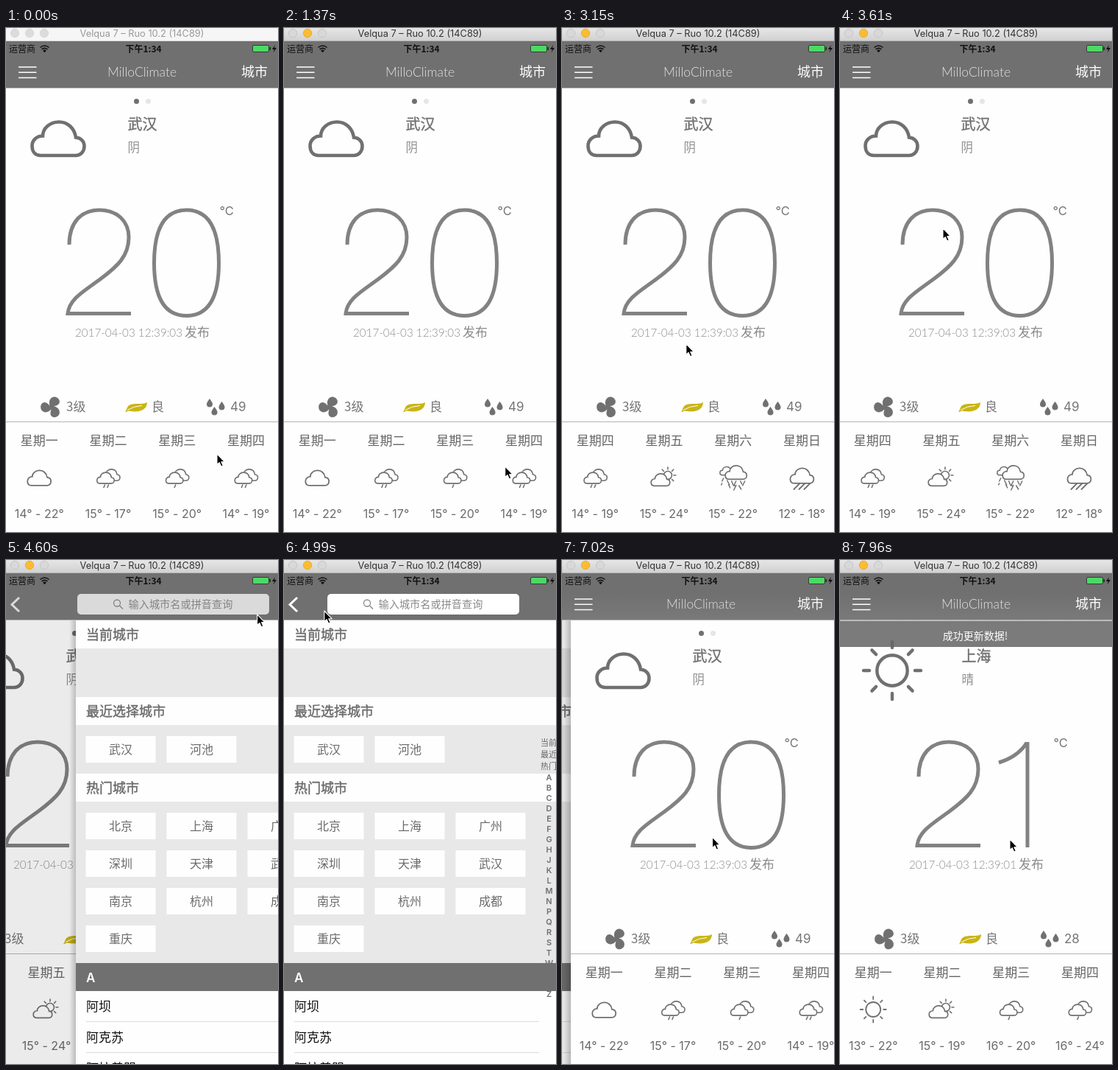
Animation, 370 px wide and 684 px high, one loop 8 s. Source, as an HTML page:

```html
<!DOCTYPE html>
<html lang="zh-CN">
<head>
<meta charset="utf-8">
<title>Weather</title>
<style>
  html, body { margin: 0; width: 100%; height: 100%; overflow: hidden; background: #fefefe; }
  svg { display: block; width: 370px; height: 684px; }
  text { font-family: "Noto Sans CJK SC", "Noto Sans CJK", sans-serif; }
  .num { font-family: Inter, Roboto, sans-serif; }
  .thin { font-family: Lato, "Open Sans", sans-serif; }
</style>
</head>
<body>
<svg id="stage" viewBox="0 0 370 684"></svg>
<script>
const LOOP = 8000, W = 375, CELL = 93.75;
const GREY = '#707070', PAPER = '#fefefe';

// Markup helpers
const text = (s, x, y, size, fill = GREY, weight = 400, extra = '') =>
  `<text x="${x}" y="${y}" font-size="${size}" fill="${fill}" font-weight="${weight}" ${extra}>${s}</text>`;
const MID = 'text-anchor="middle"', NUM = 'class="num"', THIN = 'class="thin"';
const medium = (s, x, y, size, fill) =>
  text(s, x, y, size, fill, 400, `stroke="${fill}" stroke-width=".4"`);
const rect = (x, y, w, h, fill, extra = '') =>
  `<rect x="${x}" y="${y}" width="${w}" height="${h}" fill="${fill}" ${extra}/>`;
const line = (d, w, stroke = GREY, extra = '') =>
  `<path d="${d}" fill="none" stroke="${stroke}" stroke-width="${w}" ${extra}/>`;
const at = (x, y, s) => `<g transform="translate(${x} ${y})">${s}</g>`;
const group = (id, s) => `<g id="${id}">${s}</g>`;
const ROUND = 'stroke-linecap="round"';

// Weather icons, centred on the origin
const CLOUD = 'M-24 23C-32 23-35.5 17-35.5 10C-35.5 2-29-3.5-21-3.5C-21-14-11-22.5 1-22.5' +
  'C13-22.5 22-14 24-1.5C31-1 35.5 4 35.5 10.5C35.5 18 30 23 24 23Z';
const cloud = (x, y, s, w) =>
  `<path d="${CLOUD}" transform="translate(${x} ${y}) scale(${s})" fill="${PAPER}" stroke="${GREY}" stroke-width="${w / s}"/>`;

function sun(r, near, far, w) {
  let rays = '';
  for (let i = 0; i < 8; i++) {
    const c = Math.cos(i * Math.PI / 4), s = Math.sin(i * Math.PI / 4);
    rays += `M${c * near} ${s * near}L${c * far} ${s * far}`;
  }
  return `<circle r="${r}" fill="none" stroke="${GREY}" stroke-width="${w}"/>` + line(rays, w, GREY, ROUND);
}

const twoClouds = cloud(4, -3.5, .34, 1.6) + cloud(-3.5, .5, .33, 1.6);
const icons = {
  cloud: cloud(0, .5, .45, 1.8),
  rain: twoClouds + line('M-2 10l-1.500 3.500', 1.6, GREY, ROUND),
  showers: twoClouds + line('M-4.500 10l-1.500 3.500M.5 10l-1.500 3.500', 1.6, GREY, ROUND),
  bright: at(5, -3, sun(5.5, 8, 11, 1.6)) + cloud(-5, 3, .36, 1.7),
  storm: cloud(-9, -9, .25, 1.5) + cloud(4, -7, .41, 1.7) +
    line('M-13 1l-2 4M-8 4l3 6M-2 5l2 5M4 5l-3 6h3l-3 6M10 5l2 4M16 5l-3 6M-6 10l2 4M8 11l3 5M-15 8l-1 2', 1.5, GREY, ROUND),
  pour: cloud(0, -2.5, .45, 1.8) + line('M-3 8l-8 8M4 8l-8 8M11 8l-8 8', 1.8, GREY, ROUND),
  sun: sun(10, 14, 17.5, 1.8)
};

const DIGITS = {
  2: 'M86 294C86 264 102 247 127 247C151 247 167 262 167 284C167 310 151 324 128 341C105 358 86 368 84 387.5H170',
  0: 'M245.500 247C275 247 289.500 272 289.500 319C289.500 366 275 390.500 245.500 390.500C216 390.500 201.500 366 201.500 319C201.500 272 216 247 245.500 247Z',
  1: 'M216 275C232 270 246 261 254 248M255 247V390'
};
const digit = (n, dx = 0) => line(DIGITS[n], 5, '#828282', `transform="translate(${dx})"`);

function drop(x, y) {
  return `<path transform="translate(${x} ${y})" fill="${GREY}" d="M0-6C3-2 4 0 4 1.5A4 4 0 0 1-4 1.5C-4 0-3-2 0-6Z"/>`;
}

const fan = at(62, 514.5, [20, 140, 260].map(a =>
  `<path transform="rotate(${a})" fill="${GREY}" d="M-1 1C-7-4-7-12-1-14.5C6-16 10-10 7-6C5-3 2-3 1 1Z"/>`).join(''));
const leaf = '<path fill="#c9b514" d="M162 521.500C164 518 164 517 165 515C168 509 177 510 183 510C187 510 190 509 192 508C192 517 183 523 167 519.500Z"/>' +
  line('M165 518.500Q174 513 185 512.500', 1, PAPER);

const forecast = days => days.map(([day, icon, low, high], i) => at(45.2 + CELL * i, 0,
  text('星期' + day, 0, 566, 17, '#666', 400, MID) + at(0, 610, icons[icon]) +
  text(`${low}° - ${high}°`, 0, 665, 16, '#6a6a6a', 400, `${MID} ${NUM}`))).join('');

function home(d, stripId) {
  return rect(0, 81, W, 603, PAPER) +
    `<circle cx="177.500" cy="99.500" r="3.500" fill="${GREY}"/><circle cx="193.500" cy="99.500" r="3.500" fill="#e6e6e6"/>` +
    rect(0, 534, W, 1, '#b4b4b4') +
    `<g class="body">` +
    at(71, 150, d.icon) +
    medium(d.city, 165.5, 138, 20, GREY) + text(d.sky, 165.5, 168, 16.5, '#8f8f8f') +
    d.digits + text('°C', 290.500, 254, 16.5, '#757575', 400, NUM) +
    text(`2017-04-03 12:39:${d.sec}`, 94, 419, 15.2, '#8c8c8c', 300, THIN) +
    text('发布', 243, 419, 17, '#8a8a8a') +
    fan + text('3级', 82, 520, 17, '#757575') +
    leaf + text('良', 198, 520, 17, '#757575') +
    drop(277, 509) + drop(293.5, 513) + drop(283.5, 520) +
    text(d.wet, 305, 520, 17, '#757575', 400, NUM) +
    group(stripId, forecast(d.days)) + '</g>';
}

const wuhan = {
  city: '武汉', sky: '阴', sec: '03', wet: 49,
  icon: cloud(0, 0, 1, 4.6), digits: digit(2) + digit(0),
  days: [['一', 'cloud', 14, 22], ['二', 'showers', 15, 17], ['三', 'rain', 15, 20], ['四', 'showers', 14, 19],
    ['五', 'bright', 15, 24], ['六', 'storm', 15, 22], ['日', 'pour', 12, 18]]
};
const shanghai = {
  city: '上海', sky: '晴', sec: '01', wet: 28,
  icon: sun(20.7, 31, 39, 4.4), digits: digit(2, 21) + digit(1),
  days: [['一', 'sun', 13, 22], ['二', 'bright', 15, 19], ['三', 'rain', 16, 20], ['四', 'rain', 16, 24]]
};

function cityPage() {
  const head = (s, y) => rect(0, y, W, 38, PAPER) + medium(s, 14, y + 25.5, 18, '#6a6a6a');
  const tiles = (names, y) => names.map((n, i) => {
    const x = 13.5 + 110 * (i % 3), top = y + 51 * Math.floor(i / 3);
    return rect(x, top, 95, 36, PAPER) + text(n, x + 47.5, top + 23.5, 16, '#6a6a6a', 400, MID);
  }).join('');
  const rows = ['阿坝', '阿克苏', '阿拉善盟'].map((n, i) =>
    text(n, 14, 612 + 42 * i, 17, '#111') + rect(14, 626 + 42 * i, 333, 1, '#dcdcdc')).join('');
  const index = ['当前', '最近', '热门'].map((s, i) => text(s, 360, 252 + 16 * i, 11, '#666', 400, MID)).join('') +
    [...'ABCDEFGHJKLMNPQRSTWXYZ'].map((s, i) =>
      text(s, 360.5, 299 + 14 * i, 11, GREY, 600, `${MID} ${NUM}`)).join('');
  return rect(0, 81, W, 603, '#e8e8e8') + rect(0, 81, W, 2, PAPER) +
    head('当前城市', 82) + head('最近选择城市', 186) + tiles(['武汉', '河池'], 239) +
    head('热门城市', 290) +
    tiles(['北京', '上海', '广州', '深圳', '天津', '武汉', '南京', '杭州', '成都', '重庆'], 343) +
    rect(0, 585, W, 99, PAPER) + rect(0, 547, W, 38, GREY) +
    text('A', 14, 572.5, 17, '#fff', 600, NUM) + rows + index;
}

const status = text('运营商', 4, 33, 12, '#111') +
  line('M46.500 26.500Q52.500 21.500 58.500 26.500M48.500 29Q52.500 25.700 56.500 29', 1.6, '#111') +
  '<path d="M50 30.500Q52.500 28.500 55 30.500L52.500 33.200Z" fill="#111"/>' +
  text('下午1:34', 187, 32.500, 12, '#111', 700, MID) +
  rect(335.5, 23.5, 22, 9, '#4cd964', 'rx="1.5" stroke="#222" stroke-width=".8"') +
  rect(358.5, 26, 1.5, 4, '#222') +
  '<path d="M366 23L362 29H365L363.500 33.500L368 27H365Z" fill="#111"/>';

const homeNav = line('M17 53H41.500M17 60.300H41.500M17 67.500H41.500', 1.5, '#fff') +
  group('title', text('MilloClimate', 185, 66, 17.5, '#e2e2e2', 300, `${MID} ${THIN}`)) +
  text('城市', 320, 66, 18, '#fff');
const cityNav = line('M18 51L8 60.500L18 70', 3, '#fff') +
  group('search', rect(59, 46, 261, 28, '#fff', 'rx="5"') +
    `<circle cx="113" cy="58.500" r="4.500" fill="none" stroke="#8a8a8a" stroke-width="1.300"/>` +
    line('M116.500 62L121 66.500', 1.4, '#8a8a8a') +
    text('输入城市名或拼音查询', 128.500, 65, 14.2, '#8a8a8a'));

const windowBar = rect(0, 0, 370, 18, '#f6f6f6', 'id="bar"') + rect(0, 17, 370, 1, '#b8b8b8', 'id="rim"') +
  [12, 32, 52].map((x, i) => `<circle id="dot${i}" cx="${x}" cy="7" r="5.700" stroke-width=".700"/>`).join('') +
  text('Velqua 7 – Ruo 10.2 (14C89)', 185, 11.500, 12.8, '#999', 400, `id="caption" ${MID} ${NUM}`);

const stage = document.getElementById('stage');
stage.innerHTML =
  `<defs>
    <linearGradient id="chrome" x2="0" y2="1"><stop stop-color="#e6e6e6"/><stop offset="1" stop-color="#d0d0d0"/></linearGradient>
    <linearGradient id="edge"><stop stop-color="#000" stop-opacity="0"/><stop offset="1" stop-color="#000" stop-opacity=".2"/></linearGradient>
    <linearGradient id="haze" x2="0" y2="1"><stop stop-color="#fff" stop-opacity="0"/><stop offset="1" stop-color="#fff" stop-opacity=".07"/></linearGradient>
  </defs>` +
  group('first', home(wuhan, 'strip')) +
  rect(0, 82, 370, 602, '#000', 'id="shade1"') +
  group('city', rect(-9, 82, 9, 602, 'url(#edge)') + cityPage()) +
  rect(0, 82, 370, 602, '#000', 'id="shade2"') +
  group('second', rect(-9, 82, 9, 602, 'url(#edge)') +
    group('stale', home(wuhan, 'stripStale')) + group('fresh', home(shanghai, 'stripFresh'))) +
  group('banner', rect(0, 82.5, 370, 35.5, '#666', 'opacity=".86"') +
    text('成功更新数据!', 184, 108, 14, '#fff', 400, MID)) +
  rect(0, 18, 370, 63.5, GREY) + rect(0, 46, 370, 35.5, 'url(#haze)', 'id="glow"') +
  status + group('homeNav', homeNav) + group('cityNav', cityNav) + windowBar +
  `<g id="cursor"><path d="M0 0V14.500L3.300 11.600L5.700 17L8.200 15.900L5.900 10.700H10.300Z"
    fill="#000" stroke="#fff" stroke-width="1.100" stroke-linejoin="round"/></g>`;

const el = {};
stage.querySelectorAll('[id]').forEach(n => el[n.id] = n);
const firstBody = el.first.querySelector('.body');

// Keyframes: time, then values
const pointer = [
  [0, 287, 578], [60, 287, 578], [690, 312, 594], [1060, 312, 594], [1110, 311, 594], [1320, 311, 594],
  [1370, 301, 595], [1750, 130, 602], [2000, 140, 606], [2390, 241, 610], [2450, 238, 610], [2700, 168, 614],
  [2970, 172, 616], [3280, 164, 300], [3480, 142, 274], [3610, 140, 272], [3780, 187, 238],
  [4250, 357, 72], [4560, 350, 74], [4990, 55, 69], [5220, 29, 74], [5500, 120, 250], [5780, 230, 430],
  [6030, 198, 490], [6090, 197, 496], [6490, 184, 366], [6850, 184, 366], [7430, 282, 414],
  [7680, 252, 340], [7960, 231, 379], [8000, 231, 379]
];
const scroll = [[1370, 0], [1750, 172], [1950, 222], [2250, 239], [2430, 239], [2680, 292], [2950, 281.25]];
const nudge = [[3260, 0], [3430, -9], [3530, -3], [3610, -1], [3720, 0]];
const unroll = [[7190, -36], [7420, 0]];

// Monotone cubic through the keyframes
function track(keys, t, c = 1) {
  const last = keys.length - 1;
  if (t <= keys[0][0]) return keys[0][c];
  if (t >= keys[last][0]) return keys[last][c];
  const i = keys.findIndex(k => k[0] > t) - 1;
  const slope = j => (keys[j + 1][c] - keys[j][c]) / (keys[j + 1][0] - keys[j][0]);
  const tangent = j => {
    if (j === 0 || j === last) return 0;
    const a = slope(j - 1), b = slope(j);
    return a * b <= 0 ? 0 : 2 * a * b / (a + b);
  };
  const h = keys[i + 1][0] - keys[i][0], u = (t - keys[i][0]) / h, v = 1 - u;
  return v * v * (1 + 2 * u) * keys[i][c] + u * u * (3 - 2 * u) * keys[i + 1][c] +
    h * u * v * (v * tangent(i) - u * tangent(i + 1));
}

// Critically damped navigation push
function push(t, start) {
  const u = Math.max(0, t - start) * .014;
  const p = 1 - (1 + u) * Math.exp(-u);
  return p > .996 ? 1 : p;
}

const move = (n, x, y = 0) => n.setAttribute('transform', `translate(${x.toFixed(2)} ${y.toFixed(2)})`);
const fade = (n, o) => n.setAttribute('opacity', Math.max(0, Math.min(1, o)).toFixed(3));
const show = (n, on) => n.setAttribute('display', on ? 'inline' : 'none');

function setWindow(active) {
  el.bar.setAttribute('fill', active ? 'url(#chrome)' : '#f6f6f6');
  el.rim.setAttribute('fill', active ? '#b4b4b4' : '#d6d6d6');
  el.caption.setAttribute('fill', active ? '#333' : '#999');
  for (let i = 0; i < 3; i++) {
    const amber = active && i === 1;
    el['dot' + i].setAttribute('fill', amber ? '#fdbc2f' : active ? '#d8d8d8' : '#dcdcdc');
    el['dot' + i].setAttribute('stroke', amber ? '#dfa023' : active ? '#bdbdbd' : '#d0d0d0');
  }
}

function draw(t) {
  const p = push(t, 4410), q = push(t, 6644);
  setWindow(t >= 1365);

  move(el.strip, -track(scroll, t));
  move(firstBody, track(nudge, t));
  move(el.first, -.3 * W * p);
  move(el.city, W * (1 - p) - .3 * W * q);
  move(el.second, W * (1 - q));
  show(el.city, p > 0 && q < 1);
  show(el.second, q > 0);
  fade(el.shade1, p < 1 ? .1 * p : 0);
  fade(el.shade2, q < 1 ? .1 * q : 0);

  const updated = t >= 7200;
  show(el.stale, !updated);
  show(el.fresh, updated);
  show(el.banner, t > 7190);
  move(el.banner, 0, track(unroll, t));

  fade(el.glow, q);
  fade(el.homeNav, q > 0 ? q : 1 - 1.5 * p);
  move(el.title, q > 0 ? 130 * (1 - q) : -110 * p);
  fade(el.cityNav, p * (1 - 2.5 * q));
  move(el.search, 150 * (1 - p) - 20 * q);

  move(el.cursor, track(pointer, t, 1), track(pointer, t, 2));
}

const begin = performance.now();
function tick() {
  draw((performance.now() - begin) % LOOP);
  requestAnimationFrame(tick);
}
tick();
</script>
</body>
</html>
```
